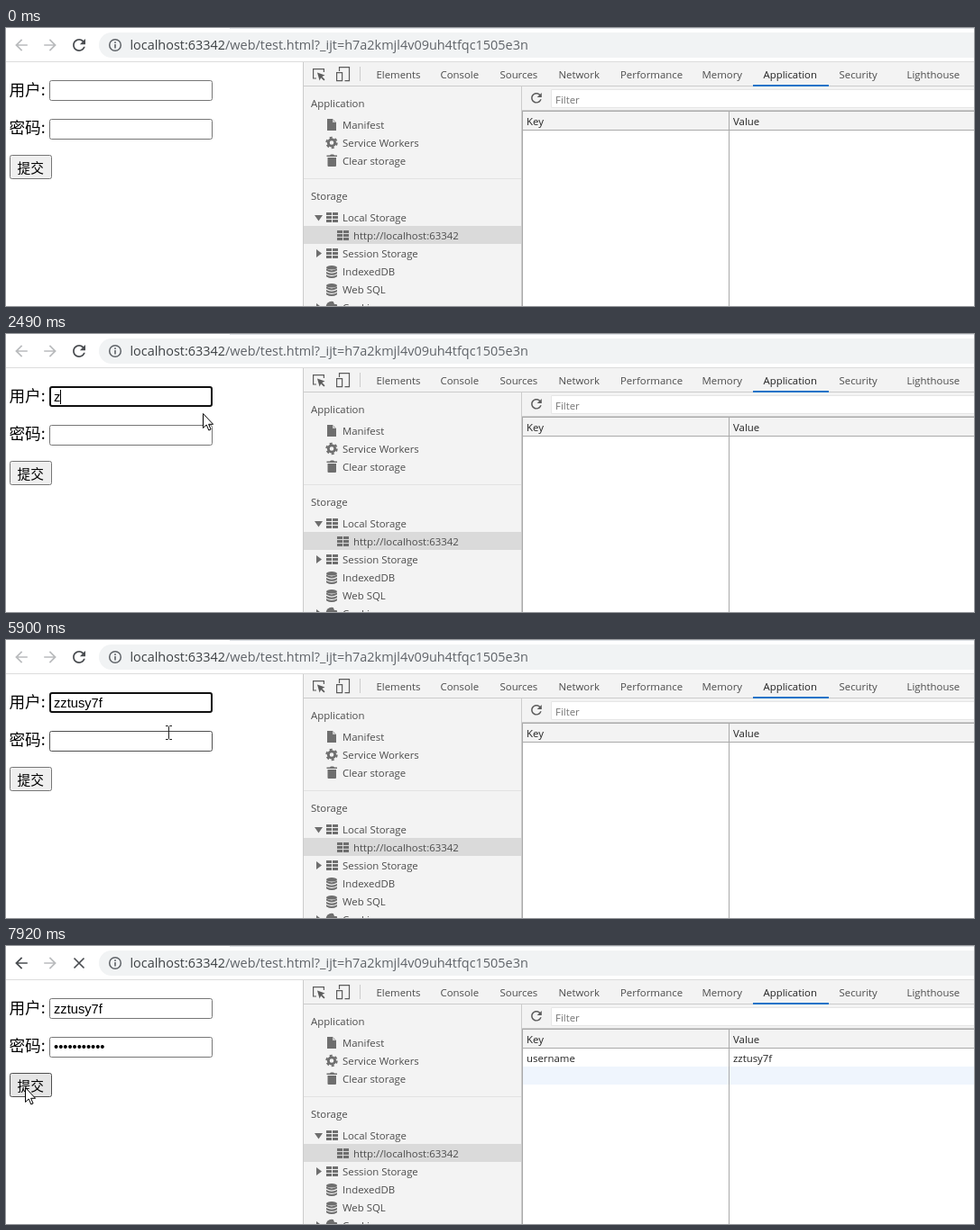
An HTML page that plays this animation: 1073 by 309 pixels, repeating every 8 s.

```html
<!DOCTYPE html>
<html lang="zh">
<head>
<meta charset="utf-8">
<title>Login form</title>
<style>
html, body { margin: 0; width: 100%; height: 100%; overflow: hidden; background: #fff; }
svg { display: block; }
text { font: 11.4px "Open Sans", sans-serif; fill: #4c4c4c; white-space: pre; }
.url { font-size: 14.45px; fill: #5f6368; }
.label { font: 17.6px "Noto Sans CJK SC", "Noto Sans CJK", sans-serif; fill: #000; }
.button { font-size: 14.67px; }
.input { font: 14.67px "Liberation Sans", sans-serif; fill: #000; }
.hint { fill: #757575; }
.dark text, text.dark { fill: #222; }
.line { stroke: #aaa; }
.soft { stroke: #ccc; }
.icon { fill: #6e6e6e; }
.field { fill: #fff; stroke: #767676; }
.field.hover { stroke: #4f4f4f; }
.field.focus { stroke: #101010; stroke-width: 2; }
</style>
</head>
<body>
<svg width="1073" height="309" viewBox="0 0 1073 309">
  <defs>
    <path id="arrow" d="M20 11H7.83l5.59-5.59L12 4l-8 8 8 8 1.41-1.41L7.83 13H20z"/>
    <path id="reload" d="M17.65 6.35C16.2 4.9 14.21 4 12 4c-4.42 0-7.99 3.58-7.99 8s3.57 8 7.99 8c3.73 0 6.84-2.55 7.73-6h-2.08c-.82 2.33-3.04 4-5.65 4-3.31 0-6-2.69-6-6s2.69-6 6-6c1.66 0 3.14.69 4.22 1.78L13 11h7V4z"/>
    <path id="grid" d="M0 0h6v3H0zM7 0h6v3H7zM0 4h6v3H0zM7 4h6v3H7zM0 8h6v3H0zM7 8h6v3H7z"/>
    <g id="disks">
      <ellipse cx="6" cy="2.3" rx="6" ry="2.3"/>
      <path id="disk" d="M0 3.6q6 3.6 12 0v2q-6 3.8-12 0z"/>
      <use href="#disk" y="3.3"/><use href="#disk" y="6.6"/>
    </g>
  </defs>

  <!-- browser toolbar -->
  <path d="M248 0h825v1H248z" fill="#dee1e6"/>
  <path d="M0 37.5h1073" stroke="#dcdcdc"/>
  <rect x="103" y="5" width="1000" height="28" rx="14" fill="#f1f3f4"/>
  <use id="back" href="#arrow" transform="translate(6.8 8.8) scale(.85)"/>
  <use href="#arrow" transform="translate(59.2 8.8) scale(-.85 .85)" fill="#babcbe"/>
  <use id="refresh" href="#reload" transform="translate(70.6 8.6) scale(.87)" fill="#4a4d51"/>
  <path id="stop" d="M75.5 13.5l11 11m0-11l-11 11" stroke="#4a4d51" stroke-width="1.7"/>
  <circle cx="121" cy="19" r="6.3" fill="none" stroke="#5f6368" stroke-width="1.5"/>
  <path d="M120.2 15.3h1.6v1.6h-1.6zm0 2.8h1.6v4.4h-1.6z" fill="#5f6368"/>
  <text class="url" x="137.4" y="24"><tspan fill="#3c4043">localhost:63342</tspan>/web/test.html?_ijt=h7a2kmjl4v09uh4tfqc1505e3n</text>

  <!-- page -->
  <text class="label" x="3.5" y="75">用户:</text>
  <text class="label" x="3.5" y="117">密码:</text>
  <rect id="userBox" rx="2"/>
  <rect id="passBox" rx="2"/>
  <text id="user" class="input" x="53" y="75"/>
  <text id="pass" class="input" x="53" y="117"/>
  <path id="caret" d="M.5 0v16" stroke="#000"/>
  <rect id="submit" x="4.5" y="141.5" width="46" height="26" rx="2"/>
  <text class="label button" x="12.5" y="160.5">提交</text>

  <!-- developer tools -->
  <path d="M330 38h743v27H330zM330 65h242v244H330zM572 65h501v48H572z" fill="#f3f3f3"/>
  <path d="M329.5 38v271M330 64.5h743M392.5 43v16" class="soft"/>
  <path d="M828 63h84v2h-84z" fill="#1a73c8"/>
  <g fill="none" stroke="#5c5c5c" stroke-width="1.2">
    <path d="M344 56h-3.4V45.6h11.8V49"/>
    <path d="M369.5 48v-4.4h11v15h-5M366.6 49.6h6v9h-6z"/>
  </g>
  <path d="M345 49.5l8.5 3-3.2 1.5 3.2 3.2-1.2 1.2-3.2-3.2-1.5 3.2z" fill="#5c5c5c"/>
  <g id="tabs"></g>

  <path d="M330 220h241v20H330z" fill="#dadada"/>
  <path d="M330 167.5h241" stroke="#e2e2e2"/>
  <g id="tree"></g>
  <g class="icon">
    <path d="M356 101h6l4 4v9h-10z"/><path d="M362 101v4h4z" fill="#c8c8c8"/>
    <g fill="none" stroke="#6e6e6e">
      <circle cx="361" cy="127.5" r="3.7" stroke-width="2.8"/>
      <circle cx="361" cy="127.5" r="5.7" stroke-width="2" stroke-dasharray="3 2.968"/>
    </g>
    <path d="M355.5 141.5h3.5l1-1h3l1 1h3v1.6h-11.5zM356.5 144h9.5v9q0 1-1 1h-7.5q-1 0-1-1z"/>
    <use href="#grid" x="355" y="205"/>
    <use href="#grid" x="367" y="225"/>
    <use href="#grid" x="355" y="245"/>
    <use href="#disks" x="355" y="264"/>
    <use href="#disks" x="355" y="284"/>
    <circle cx="361" cy="310" r="6.3"/>
    <path d="M362 302h6v5h-4z" fill="#f3f3f3"/>
    <path d="M342 208h9l-4.5 6.5zM344 246v9l6-4.5zM344 306v9l6-4.5z"/>
  </g>

  <path d="M573 114h500v195H573z" fill="#fff"/>
  <path d="M604.5 68.5h480v20h-480z" fill="#fff" stroke="#e6e6e6"/>
  <use href="#reload" transform="translate(579.2 69) scale(.73)" fill="#5c5c5c"/>
  <text class="hint" x="609" y="83.5">Filter</text>
  <g id="row" class="dark">
    <path d="M573 134h500v20H573z" fill="#eff5fd"/>
    <text x="577" y="129">username</text>
    <text id="stored" x="806" y="129"/>
  </g>
  <path d="M571.5 65v244M572 91.5h501" class="soft"/>
  <path d="M572.5 92v217M572 92.5h501M572 113.5h501M801.5 92v217" class="line"/>
  <text class="dark" x="577" y="108">Key</text>
  <text class="dark" x="806" y="108">Value</text>

  <g id="pointer">
    <path id="hand" d="M.5 .5v16l3.7-3.5 2.6 6 2.3-1-2.5-5.7h5z" fill="#fff" stroke="#000"/>
    <path id="beam" d="M-3-7.5h2.5l1 1 1-1H4M.5-6.5v13M-3 7.5h2.5l1-1 1 1H4" fill="none" stroke="#222"/>
  </g>
</svg>
<script>
const LOOP = 8000, NAME = 'zztusy7f';
const $ = id => document.getElementById(id);
const set = (id, attrs) => { for (const k in attrs) $(id).setAttribute(k, attrs[k]); };
const show = (id, on) => set(id, { visibility: on ? 'inherit' : 'hidden' });
const at = (steps, t) => steps.filter(s => s[0] <= t).pop();
const labels = (id, list) => {
  $(id).innerHTML = list.map(([s, x, y]) => `<text x="${x}" y="${y}">${s}</text>`).join('');
};

labels('tabs', [['Elements', 410.5], ['Console', 481.5], ['Sources', 547.5], ['Network', 612.5],
  ['Performance', 681], ['Memory', 771.5], ['Application', 839.5], ['Security', 923.5],
  ['Lighthouse', 998.5]].map(([s, x]) => [s, x, 56]));
$('tabs').children[6].style.fill = '#222';
labels('tree', [['Application', 338, 88], ['Manifest', 373, 112], ['Service Workers', 373, 132],
  ['Clear storage', 373, 152], ['Storage', 338, 191], ['Local Storage', 373, 215],
  ['http://localhost:63342', 385, 235], ['Session Storage', 373, 255], ['IndexedDB', 373, 275],
  ['Web SQL', 373, 295], ['Cookies', 373, 315]]);
$('stored').textContent = NAME;

// [time, value...]
const pointer = [[0], [300, 579, 249, 'hand'], [450, 330, 176, 'hand'], [600, 190, 128, 'hand'],
  [770, 191, 108, 'beam'], [920, 196, 74, 'beam'], [1240, 205, 83, 'hand'], [1390, 218, 88, 'hand'],
  [5590, 207, 92, 'hand'], [5740, 190, 102, 'beam'], [5900, 180, 103, 'beam'], [6360],
  [6990, 150, 126, 'hand'], [7140, 112, 146, 'hand'], [7300, 84, 156, 'hand'],
  [7460, 73, 159, 'hand'], [7610, 40, 159, 'hand'], [7770, 21, 157, 'hand']];
const typed = [[0, 0], [2490, 1], [2640, 2], [3580, 4], [3730, 5], [3880, 6], [4660, 7], [4980, 8]];
const dots = [[0, 0], [6360, 5], [6530, 11]];
const focus = [[0, ''], [1080, 'user'], [6060, 'pass'], [7770, '']];
const blink = [[0, 1], [1710, 0], [2170, 1], [4510, 0], [4660, 1], [5440, 0], [6060, 1]];

function field(id, top, focused, hover) {
  const d = focused ? 1 : .5;
  set(id, {
    class: 'field' + (hover ? ' hover' : '') + (focused ? ' focus' : ''),
    x: 48 + d, y: top + d, width: 181 - 2 * d, height: 23 - 2 * d
  });
}

function draw(now) {
  const t = now % LOOP;
  const active = at(focus, t)[1], done = t >= 7920, pressing = t >= 7610;
  const [, x, y, kind] = at(pointer, t);
  const over = top => kind === 'beam' && y >= top && y < top + 23;

  $('user').textContent = NAME.slice(0, at(typed, t)[1]);
  $('pass').textContent = '•'.repeat(at(dots, t)[1]);
  field('userBox', 58, active === 'user', over(58));
  field('passBox', 101, active === 'pass', over(101));

  show('caret', active && at(blink, t)[1]);
  if (active) {
    const end = Math.round(53 + $(active).getComputedTextLength());
    set('caret', { transform: `translate(${end} ${active === 'user' ? 62 : 104})` });
  }

  set('submit', { fill: pressing ? '#e5e5e5' : '#efefef', stroke: pressing ? '#4f4f4f' : '#767676' });
  set('back', { fill: done ? '#4a4d51' : '#babcbe' });
  show('refresh', !done);
  show('stop', done);
  show('row', done);

  show('hand', kind === 'hand');
  show('beam', kind === 'beam');
  if (kind) set('pointer', { transform: `translate(${x} ${y})` });
  requestAnimationFrame(draw);
}
requestAnimationFrame(draw);
</script>
</body>
</html>
```
